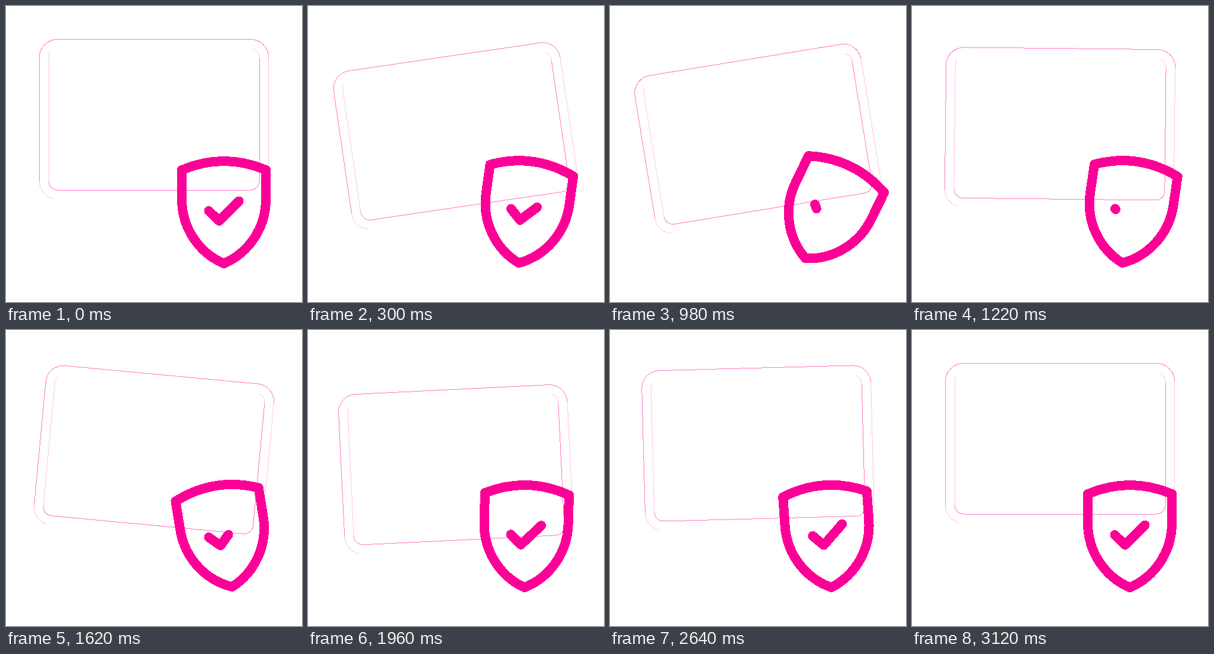
Write an HTML page that moves like this. It is 500 by 500 pixels and loops after 4000 ms.

```html
<!DOCTYPE html>
<html lang="en">
<head>
<meta charset="utf-8">
<title>Protected card</title>
<style>
  html, body { margin: 0; width: 100%; height: 100%; overflow: hidden; background: #fff; }
  svg { display: block; width: 100vw; height: 100vh; shape-rendering: crispEdges; }
  path { fill: none; }
  #card { stroke-width: 1; }
  .edge { stroke: #ff7cc8; }
  .faint { stroke: #ffc8e8; }
  #shield { stroke: #fb0097; stroke-width: 16; stroke-linecap: round; stroke-linejoin: round; }
</style>
</head>
<body>
<svg viewBox="0 0 500 500">
  <!-- Card outline, centred on its own origin -->
  <g id="card">
    <path class="faint" d="M193.5 -105V100"/>
    <path class="faint" d="M-178 104V-104Q-178 -112 -175 -115"/>
    <path class="edge" d="M-193.5 105V-105A30 30 0 0 1 -163.5 -135H163.5A30 30 0 0 1 193.5 -105"/>
    <path class="faint" d="M-193.5 105A30 30 0 0 0 -170 134"/>
    <path class="edge" d="M178 -104V104A15.5 15.5 0 0 1 162.5 119.5H-162.5A15.5 15.5 0 0 1 -178 104"/>
    <path class="faint" d="M168 -118.5Q178 -115 178 -104"/>
  </g>
  <g id="shield">
    <path d="M297 277Q368 247 439 277V326C439 375 410 417 368 435C326 417 297 375 297 326Z"/>
    <path id="check" pathLength="1" d="M342.5 346L360 363L393.5 329.5"/>
  </g>
</svg>
<script>
  const LOOP = 4000, STEP = 20;
  const card = document.getElementById('card');
  const shield = document.getElementById('shield');
  const check = document.getElementById('check');

  const linear = x => x;
  const smooth = x => x * x * (3 - 2 * x);
  const easeIn = x => x ** 1.6;
  const easeOut = x => 1 - (1 - x) ** 1.43;

  // Each key: time in ms, value, easing of the way to it
  const cardTurn = [[0, 0], [720, -20], [1440, 9.7], [2060, -5.2], [2880, 0]];
  const cardDrop = [[0, 0], [720, 52, easeOut], [1440, -1], [2000, 45, easeOut], [2720, 0, easeIn]];
  const shieldTurn = [[0, 0], [1040, 27.5], [1440, -15], [2160, 8], [2640, -4], [3120, 0]];
  const checkLength = [[0, 1], [1200, 0.02, smooth], [1900, 1, smooth]];

  function valueAt(keys, t) {
    const i = keys.findIndex(key => key[0] > t);
    if (i < 0) return keys[keys.length - 1][1];
    const [t0, v0] = keys[i - 1];
    const [t1, v1, ease = linear] = keys[i];
    return v0 + (v1 - v0) * ease((t - t0) / (t1 - t0));
  }

  function draw(t) {
    const y = 191.5 + valueAt(cardDrop, t);
    card.setAttribute('transform', `translate(250 ${y}) rotate(${valueAt(cardTurn, t)})`);
    shield.setAttribute('transform', `rotate(${valueAt(shieldTurn, t)} 368 348.5)`);
    const length = valueAt(checkLength, t);
    check.setAttribute('stroke-dasharray', length < 1 ? `${length} 2` : 'none');
  }

  const start = performance.now();
  function tick() {
    const t = (performance.now() - start) % LOOP;
    draw(Math.floor(t / STEP) * STEP);
    requestAnimationFrame(tick);
  }
  tick();
</script>
</body>
</html>
```
